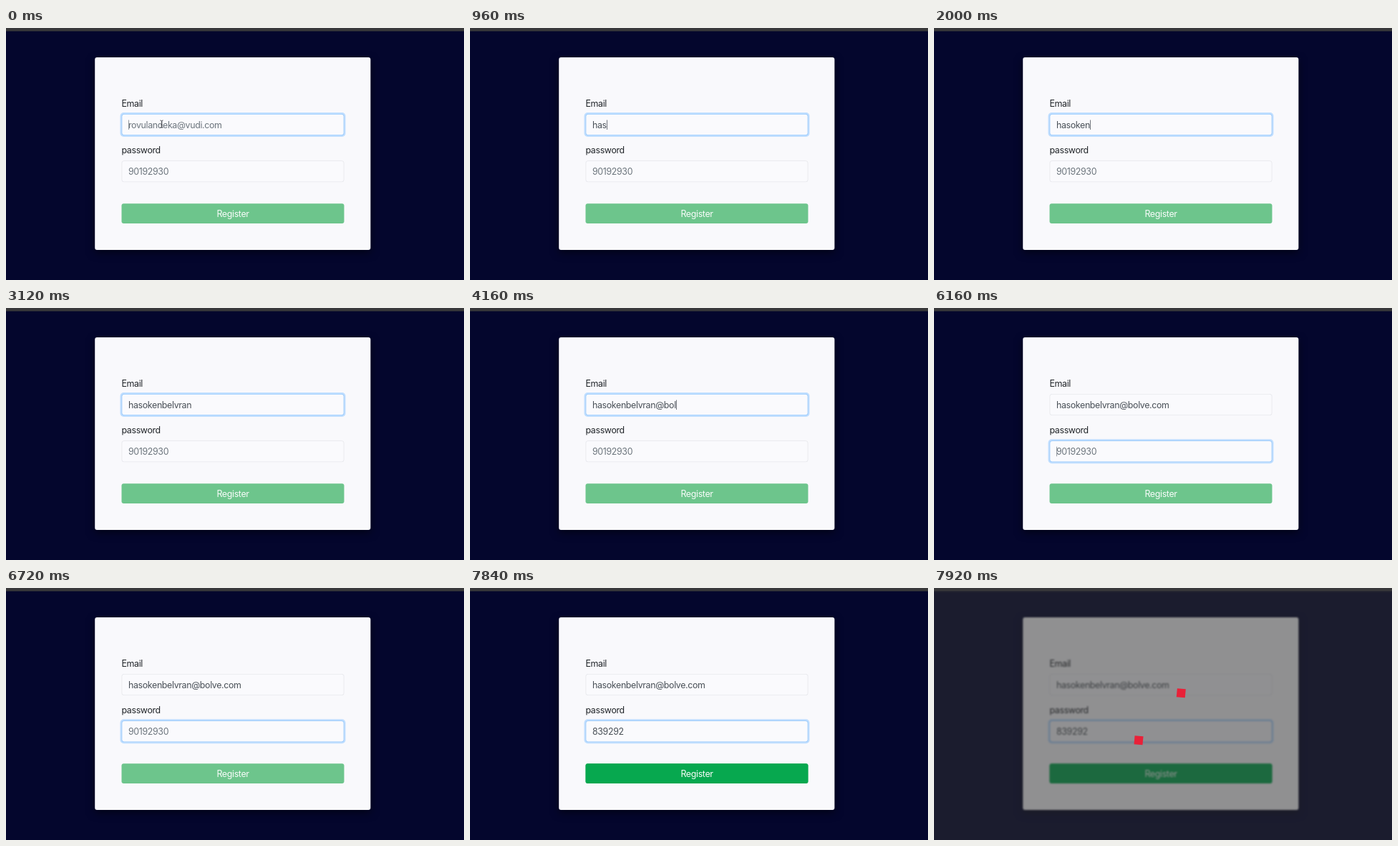
Animation of 640x352 px, one loop 8000 ms. Source, as an HTML page with a canvas:

```html
<!DOCTYPE html>
<html lang="en">
<head>
<meta charset="utf-8">
<title>Register form</title>
<style>
  html, body { margin: 0; width: 100%; height: 100%; overflow: hidden; background: #04062d; }
  canvas { display: block; width: 100%; height: 100%; }
</style>
</head>
<body>
<canvas id="stage" width="640" height="352"></canvas>
<script>
const W = 640, H = 352, LOOP = 8000;
const FIELD = { x: 161.5, w: 311, h: 30, textX: 171 };
const EMAIL = 'hasokenbelvran@bolve.com';
const PASSWORD = '839292';
const TAB_AT = 5920, LOADING_AT = 7920, FADE = 150;

const every = (start, step, count) => Array.from({ length: count }, (_, i) => start + i * step);
const emailKeys = [
  240, 480, 800, 1200, 1440, 1680, 1920,
  ...every(2080, 80, 7),
  ...every(3520, 200, 9), 5360
];
const passwordKeys = every(6800, 100, 6);

const canvas = document.getElementById('stage');
const screen = canvas.getContext('2d');
const formLayer = document.createElement('canvas');
formLayer.width = W;
formLayer.height = H;
const ctx = formLayer.getContext('2d');

const clamp = v => Math.max(0, Math.min(1, v));
const fade = (t, start) => clamp((t - start) / FADE);
const typedCount = (keys, t) => keys.filter(k => k <= t).length;

function box(x, y, w, h, r, fill) {
  ctx.beginPath();
  ctx.roundRect(x, y, w, h, r);
  ctx.fillStyle = fill;
  ctx.fill();
}

function label(str, x, y, color, align = 'left') {
  ctx.font = '12.4px Inter, "Open Sans", sans-serif';
  ctx.letterSpacing = '-0.35px';
  ctx.textAlign = align;
  ctx.fillStyle = color;
  ctx.fillText(str, x, y);
  return ctx.measureText(str).width;
}

function caretOn(t, keys, focusedAt) {
  const last = Math.max(focusedAt, ...keys.filter(k => k <= t));
  return (t - last) % 1000 < 500;
}

function field(y, value, hint, focus, showCaret) {
  const { x, w, h, textX } = FIELD;
  if (focus > 0) {
    ctx.globalAlpha = focus;
    box(x - 2, y - 2, w + 4, h + 4, 5, '#bfdeff');
    ctx.globalAlpha = 1;
  }
  box(x, y, w, h, 3.5, '#e7e8ec');
  if (focus > 0) {
    ctx.globalAlpha = focus;
    box(x, y, w, h, 3.5, '#8fc6ff');
    ctx.globalAlpha = 1;
  }
  box(x + 0.8, y + 0.8, w - 1.6, h - 1.6, 3, '#fafafd');
  const width = label(value || hint, textX, y + 19.6, value ? '#495057' : '#6c757d');
  if (showCaret) {
    ctx.fillStyle = value ? '#50565e' : '#7b828a';
    ctx.fillRect(textX + (value ? width + 0.3 : 0), y + 8.5, 0.8, 13.5);
  }
}

function pointer(x, y) {
  ctx.strokeStyle = '#4a4d52';
  ctx.lineWidth = 1;
  ctx.beginPath();
  ctx.moveTo(x - 2, y - 5);
  ctx.quadraticCurveTo(x, y - 5, x, y - 3.5);
  ctx.quadraticCurveTo(x, y - 5, x + 2, y - 5);
  ctx.moveTo(x, y - 3.5);
  ctx.lineTo(x, y + 3.5);
  ctx.moveTo(x - 2, y + 5);
  ctx.quadraticCurveTo(x, y + 5, x, y + 3.5);
  ctx.quadraticCurveTo(x, y + 5, x + 2, y + 5);
  ctx.moveTo(x - 1.2, y + 1.5);
  ctx.lineTo(x + 1.2, y + 1.5);
  ctx.stroke();
}

function drawForm(t) {
  ctx.fillStyle = '#04062d';
  ctx.fillRect(0, 0, W, H);
  ctx.fillStyle = '#39393b';
  ctx.fillRect(0, 0, W, 4.5);

  ctx.save();
  ctx.shadowColor = 'rgba(0,0,0,.5)';
  ctx.shadowBlur = 12;
  ctx.shadowOffsetY = 4;
  box(124.2, 41, 385.2, 269, 3, '#f9f9fc');
  ctx.restore();

  const email = EMAIL.slice(0, typedCount(emailKeys, t));
  const password = PASSWORD.slice(0, typedCount(passwordKeys, t));
  const tabbed = fade(t, TAB_AT);
  const onEmail = t < TAB_AT;

  label('Email', 161.5, 110, '#212529');
  field(120, email, 'rovulandeka@vudi.com', 1 - tabbed, onEmail && caretOn(t, emailKeys, 0));
  label('password', 161.5, 175, '#212529');
  field(185.2, password, '90192930', tabbed, !onEmail && caretOn(t, passwordKeys, TAB_AT));
  if (!email) pointer(217.5, 134);

  const ready = fade(t, passwordKeys[0]);
  box(161.5, 245.2, 311, 27.8, 3, '#6dc58c');
  ctx.globalAlpha = ready;
  box(161.5, 245.2, 311, 27.8, 3, '#07a84f');
  ctx.globalAlpha = 1;
  label('Register', 317, 263.6, '#fafcfb', 'center');
}

function loaderSquare(x, y) {
  screen.save();
  screen.translate(x, y);
  screen.rotate(0.09);
  screen.fillStyle = '#e92138';
  screen.fillRect(-6, -6, 12, 12);
  screen.restore();
}

function drawLoading() {
  screen.save();
  screen.beginPath();
  screen.rect(0, 4, W, H - 4);
  screen.clip();
  screen.filter = 'blur(1px)';
  screen.drawImage(formLayer, 0, 0);
  screen.filter = 'none';
  screen.fillStyle = 'rgba(48,48,48,.52)';
  screen.fillRect(0, 4, W, H - 4);
  screen.restore();
  loaderSquare(345.3, 146.8);
  loaderSquare(286, 212.8);
}

function draw(t) {
  drawForm(t);
  screen.drawImage(formLayer, 0, 0);
  if (t >= LOADING_AT) drawLoading();
}

const began = performance.now();
function tick() {
  draw((performance.now() - began) % LOOP);
  requestAnimationFrame(tick);
}
tick();
</script>
</body>
</html>
```
